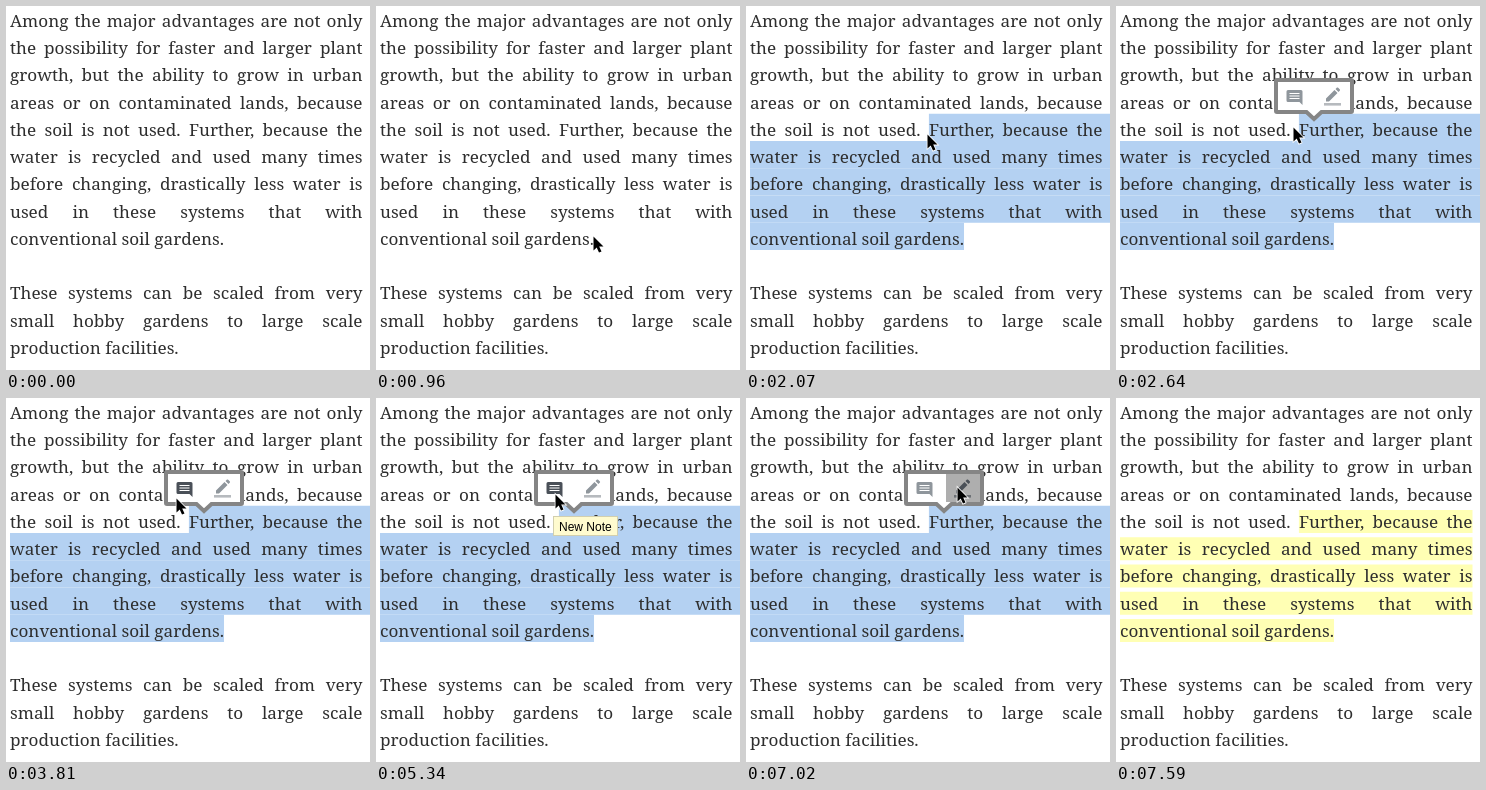
An HTML page for the animation above (8000 ms loop, 364 px wide and 364 px high).

```html
<!DOCTYPE html>
<html lang="en">
<head>
<meta charset="utf-8">
<title>Selecting and highlighting text</title>
<style>
  html, body { margin: 0; width: 100%; height: 100%; overflow: hidden; background: #fff; }
  #stage { position: absolute; left: 0; top: 0; width: 364px; height: 364px; overflow: hidden; }
  svg { position: absolute; left: 0; top: 0; }
  #text {
    position: absolute; left: 4px; top: 0.9px; width: 352.5px;
    font: 17.15px/27.25px "Noto Serif", serif; color: #2e2e2e;
  }
  .line { height: 27.25px; white-space: nowrap; text-align: justify; text-align-last: justify; }
  .line.end { text-align-last: left; }
</style>
</head>
<body>
<div id="stage">
  <svg id="back" width="364" height="364"></svg>
  <div id="text"></div>
  <svg width="364" height="364">
    <g id="popup">
      <path d="M161 74H235Q236 74 236 75V105Q236 106 235 106H205.500L198 113L190.500 106H161Q160 106 160 105V75Q160 74 161 74Z"
            fill="#fff" stroke="#858585" stroke-width="4"/>
      <rect id="press" x="200" y="76" width="34" height="28" fill="#aeaeae"/>
      <g id="note">
        <path d="M172 84H185Q186.500 84 186.500 85.500V99L183.500 96H172Q170.500 96 170.500 94.500V85.500Q170.500 84 172 84Z"/>
        <path d="M173.500 87.500H183.500M173.500 90H183.500M173.500 92.500H183.500" stroke="#fff" stroke-width="1.200"/>
      </g>
      <g id="pencil">
        <path d="M210 92.500L218.500 84L221.500 87L213 95.500H210Z M219.500 83L221 81.600Q221.600 81.200 222.200 81.700L223.900 83.400Q224.300 84 223.900 84.500L222.500 86Z"/>
        <rect x="208" y="97" width="17" height="2.600" opacity=".65"/>
      </g>
    </g>
    <g id="tip">
      <rect x="177.500" y="118.500" width="64" height="19" fill="#fffbcf" stroke="#d2cfae"/>
      <text x="183" y="132.500" font-size="12" font-family="'Liberation Sans', Arial, sans-serif">New Note</text>
    </g>
    <path id="cursor" d="M0.500 0.500V14.500L3.700 11.500L6 16.600L8.500 15.500L6.200 10.600H10.500Z"
          fill="#000" stroke="#fff" stroke-width="1.600" paint-order="stroke"/>
  </svg>
</div>
<script>
const LOOP = 8000, STEP = 30, STAGE = 364, PITCH = 27.25;
const LEFT = 4, RIGHT = 356.5;
const PARAGRAPHS = [
  ["Among the major advantages are not only", "the possibility for faster and larger plant",
   "growth, but the ability to grow in urban", "areas or on contaminated lands, because",
   "the soil is not used. Further, because the", "water is recycled and used many times",
   "before changing, drastically less water is", "used in these systems that with",
   "conventional soil gardens."],
  ["These systems can be scaled from very", "small hobby gardens to large scale",
   "production facilities."]
];
const LAST = PARAGRAPHS[0].length - 1;

// Selection fills the gap above each line; the highlight covers only the glyph area
const SELECTION = { color: "#b4d1f2", top: -1.25, height: PITCH, right: STAGE };
const HIGHLIGHT = { color: "#ffffb4", top: 3, height: 23, right: RIGHT };

// Pointer positions: time, x, y
const PATH = [
  [270, 364, 218], [480, 300, 229], [660, 251, 237], [810, 227, 237], [960, 217, 230],
  [1350, 217, 230], [1500, 212, 211], [1650, 201, 179], [1860, 188, 146], [2040, 181, 129],
  [2160, 179, 126], [2280, 177, 121], [3090, 177, 121], [3300, 174, 111], [3570, 169, 101],
  [3780, 169, 101], [3930, 176, 97], [5310, 176, 97], [5550, 196, 92], [5790, 214, 93],
  [6570, 214, 93], [6780, 211, 89], [7440, 211, 89], [7560, 313, 52]
];

const $ = id => document.getElementById(id);
const show = (id, on) => $(id).setAttribute("visibility", on ? "visible" : "hidden");
const clamp = (v, lo, hi) => Math.min(hi, Math.max(lo, v));

function buildText() {
  PARAGRAPHS.forEach((lines, p) => {
    const block = document.createElement("div");
    if (p) block.style.marginTop = PITCH + "px";
    lines.forEach((words, i) => {
      const line = document.createElement("div");
      line.className = i === lines.length - 1 ? "line end" : "line";
      line.textContent = words;
      block.append(line);
    });
    $("text").append(block);
  });
}

// Left edges of all characters in a line, plus the right end of the line
function caretStops(line) {
  const node = line.firstChild, range = document.createRange();
  const stops = [...node.data].map((_, i) => {
    range.setStart(node, i);
    range.setEnd(node, i + 1);
    return range.getBoundingClientRect().left;
  });
  return [...stops, range.getBoundingClientRect().right];
}

buildText();
const stops = [...document.querySelectorAll("#text > div:first-child .line")].map(caretStops);
const FURTHER = { row: 4, x: stops[4][PARAGRAPHS[0][4].indexOf("Further")] };

function pointerAt(t) {
  const i = PATH.findIndex(k => k[0] > t);
  if (i === 0) return PATH[0].slice(1);
  if (i < 0) return PATH[PATH.length - 1].slice(1);
  const [t0, x0, y0] = PATH[i - 1], [t1, x1, y1] = PATH[i];
  const u = (t - t0) / (t1 - t0);
  return [x0 + (x1 - x0) * u, y0 + (y1 - y0) * u];
}

function caretAt(x, y) {
  const row = clamp(Math.floor((y - SELECTION.top) / PITCH), 0, LAST);
  const nearest = stops[row].reduce((a, b) => Math.abs(b - x) < Math.abs(a - x) ? b : a);
  return { row, x: nearest };
}

function bands(start, { color, top, height, right }) {
  let out = "";
  for (let row = start.row; row <= LAST; row++) {
    const x = row === start.row ? start.x : LEFT;
    const end = row === LAST ? stops[LAST][stops[LAST].length - 1] : right;
    out += `<rect x="${x}" y="${top + row * PITCH}" width="${Math.max(0, end - x)}"
      height="${height}" fill="${color}"/>`;
  }
  return out;
}

function render(t) {
  const [x, y] = pointerAt(t);
  show("cursor", t >= 270 && t < 7590);
  $("cursor").setAttribute("transform", `translate(${Math.round(x)} ${Math.round(y)})`);

  let marks = "";
  if (t >= 7080) marks = bands(FURTHER, HIGHLIGHT);
  else if (t >= 2160) marks = bands(FURTHER, SELECTION);
  else if (t >= 1380) marks = bands(caretAt(x, y), SELECTION);
  $("back").innerHTML = marks;

  const open = t >= 2640 && t < 7080;
  const overNote = open && y < 104 && x < 198;
  const overPencil = open && y < 104 && x >= 198;
  show("popup", open);
  show("tip", overNote && t >= 4830);
  $("note").setAttribute("fill", overNote ? "#4a5058" : "#8f969c");
  $("pencil").setAttribute("fill", overPencil ? "#4a5058" : "#8f969c");
  $("press").setAttribute("opacity", clamp((t - 6900) / 90, 0, 1));
}

const start = performance.now();
function tick() {
  const t = (performance.now() - start) % LOOP;
  render(Math.floor(t / STEP) * STEP);
  requestAnimationFrame(tick);
}
tick();
</script>
</body>
</html>
```
